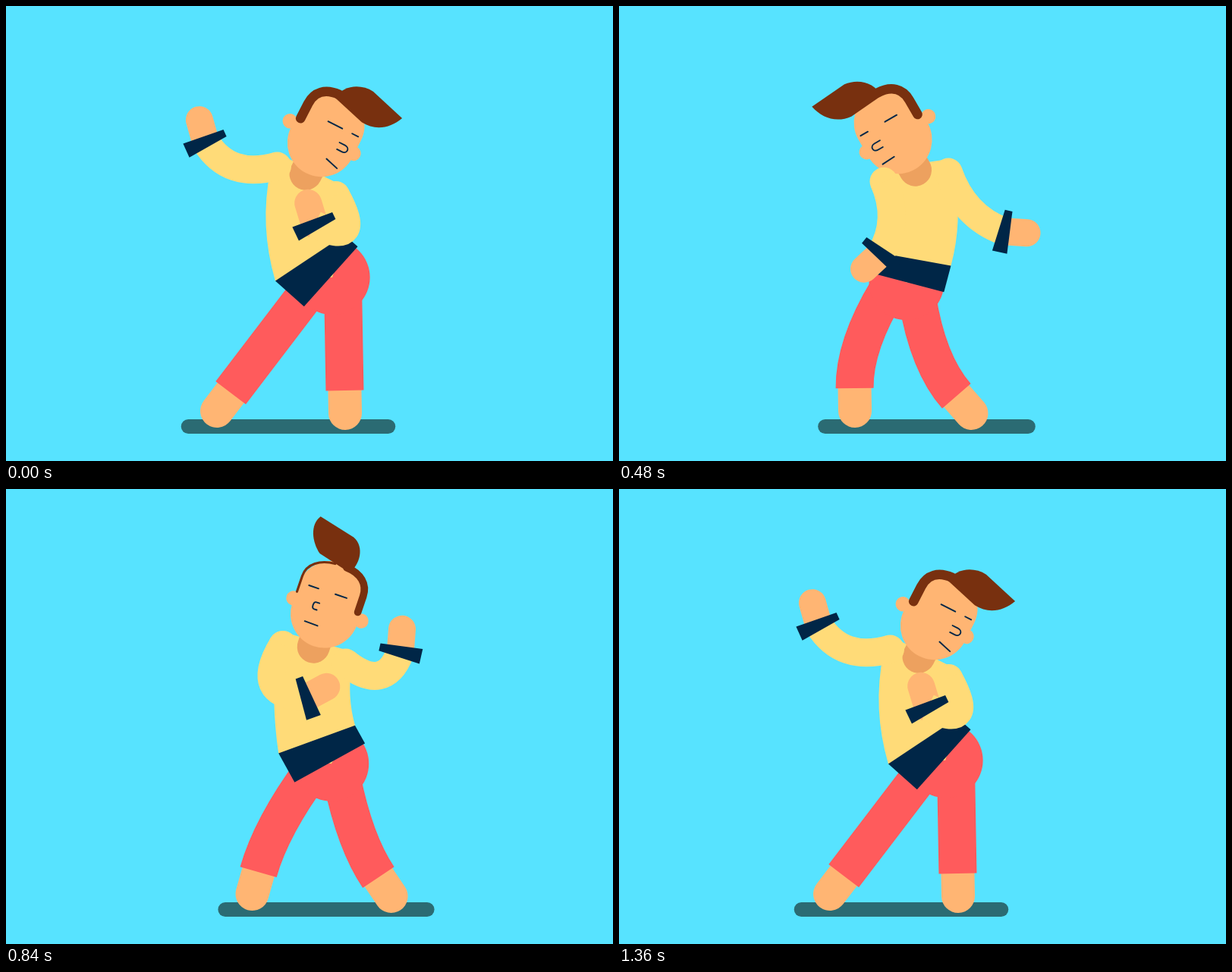
An HTML page with a canvas that plays this animation: 800x600 px, repeating every 1400 ms.

```html
<!DOCTYPE html>
<html lang="en">
<head>
<meta charset="utf-8">
<title>Dancer</title>
<style>
html, body { margin: 0; height: 100%; overflow: hidden; background: #57e3ff; }
canvas { display: block; width: 800px; height: 600px; }
</style>
</head>
<body>
<canvas id="stage" width="800" height="600"></canvas>
<script>
const ctx = document.getElementById('stage').getContext('2d');
const LOOP = 1400, STEP = 40, CYCLE = 1360;
const SKY = '#57e3ff', SHADE = '#2b6b73', SKIN = '#ffb573', NECK = '#eda15f',
      HAIR = '#78300f', SHIRT = '#ffdb78', NAVY = '#002647', RED = '#ff5b5c';

// Quiff outlines, y up: curve p0-p3, line to p4, curve to p7
const QUIFF_SIDE = [[-11, 61], [-9, 80], [10, 93], [30, 91], [80, 77], [72, 58], [56, 46], [35, 48]];
const QUIFF_FRONT = [[-17, 62], [-22, 74], [-42, 100], [-18, 101], [34, 102], [56, 101], [38, 66], [28, 62]];

let time = 0;

const rad = d => d * Math.PI / 180;
const clamp = (v, lo = -1, hi = 1) => Math.max(lo, Math.min(hi, v));
const smooth = u => u * u * (3 - 2 * u);
const ease = (from, to) => smooth(clamp((time - from) / (to - from), 0, 1));
// Harmonic n of the dance cycle, shifted by a phase in degrees
const wave = (n = 1, shift = 0, offset = 0) =>
  Math.cos(rad(n * (time / CYCLE * 360 + offset) + shift));
const polar = (r, deg) => [r * Math.cos(rad(deg)), r * Math.sin(rad(deg))];
const add = (a, b) => [a[0] + b[0], a[1] + b[1]];

function disc([x, y], r, color) {
  ctx.fillStyle = color;
  ctx.beginPath();
  ctx.arc(x, y, r, 0, 7);
  ctx.fill();
}
function stroke(color, width, cap, path) {
  ctx.strokeStyle = color;
  ctx.lineWidth = width;
  ctx.lineCap = cap;
  ctx.beginPath();
  path();
  ctx.stroke();
}
function line(color, width, a, b) {
  stroke(color, width, 'round', () => { ctx.moveTo(...a); ctx.lineTo(...b); });
}
function bend(color, width, a, mid, b) {
  stroke(color, width, 'butt', () => { ctx.moveTo(...a); ctx.quadraticCurveTo(...mid, ...b); });
}
function poly(color, ...points) {
  ctx.fillStyle = color;
  ctx.beginPath();
  points.forEach(p => ctx.lineTo(...p));
  ctx.fill();
}

// The knee bows out to the left as the hips sink.
function leg(hip, joint, foot) {
  const a = add(hip, joint), dx = foot[0] - a[0], dy = foot[1] - a[1];
  const bow = 60 * (1 - Math.exp(Math.min(0, 358 - hip[1]) / 13)) / Math.hypot(dx, dy);
  const knee = [a[0] + dx / 2 - dy * bow, a[1] + dy / 2 + dx * bow];
  const shin = Math.atan2(knee[1] - foot[1], knee[0] - foot[0]) * 180 / Math.PI;
  const hem = add(foot, polar(30, shin));
  line(SKIN, 44, hem, foot);
  bend(RED, 50, a, knee, hem);
}

function torso(hip, sway, left, right) {
  const corner = (x, y) => add(add(hip, [-2, -1]), add(polar(x, sway), polar(y, sway + 90)));
  const bl = corner(-53, 0), br = corner(53, 0);
  const tl = corner(-53, 0.37 * sway - 33), tr = corner(53, -0.2 * sway - 33);
  const a = add(left, [-9, 6]), b = add(right, [8, 6]);
  const side = (p, q) => [(p[0] + q[0] + sway) / 2 + 6, (p[1] + q[1]) / 2];
  ctx.fillStyle = SHIRT;
  ctx.beginPath();
  ctx.moveTo(left[0], left[1] - 17);
  ctx.lineTo(...a);
  ctx.quadraticCurveTo(...side(a, tl), ...tl);
  ctx.lineTo(...hip);
  ctx.lineTo(...tr);
  ctx.quadraticCurveTo(...side(b, tr), ...b);
  ctx.lineTo(right[0], right[1] - 17);
  ctx.fill();
  poly(NAVY, tl, tr, br, bl);
}

// Both arms follow one motion, half a cycle apart and mirrored.
function arm(shoulder, side, { swing, lag, skew, lift, lead }) {
  const half = side < 0 ? 180 : 0;
  const w = (n, shift) => wave(n, shift, half);
  const hand = 485 + swing * w(1, -lag) - 37 * w(2, skew) + 20 * w(3, 0);
  const upper = 114 + lift * w(1, lead) + 27 * w(2, -23);
  const fore = hand - Math.min(16, (hand - 407) * 0.4);
  const tuck = 14 * smooth(clamp((390 - hand) / 60, 0, 1));
  const dip = Math.exp(-(((hand - 450) / 70) ** 2));
  const flare = 2.5 * clamp((hand - 450) / 30);
  const elbow = polar(66 + tuck - 16 * dip, upper);
  const wrist = add(elbow, polar(59 + tuck - 12 * dip, fore));

  ctx.save();
  ctx.translate(...shoulder);
  ctx.scale(side, 1);
  line(SKIN, 36, wrist, add(wrist, polar(30, hand)));
  disc([0, 0], 18.5, SHIRT);
  bend(SHIRT, 37, [0, 0], elbow, wrist);
  ctx.translate(...wrist);
  ctx.rotate(rad(hand + 90 - 3.4 * flare));
  const p = 7.5 - flare, m = 7.5 + flare;
  poly(NAVY, [-28, -m], [28, -p], [28, p], [-28, m]);
  ctx.restore();
}

function quiff(turn, lift) {
  const px = -11, py = 67;
  let side = QUIFF_SIDE.map(([x, y]) =>
    add([px, py], add(polar(x - px, lift), polar(y - py, lift + 90))));
  if (turn < 0) side = side.reverse().map(([x, y]) => [-x, y]);
  const k = Math.abs(turn);
  const p = QUIFF_FRONT.map((f, i) => f.map((v, j) => v + (side[i][j] - v) * k));
  ctx.fillStyle = HAIR;
  ctx.beginPath();
  ctx.moveTo(...p[0]);
  ctx.bezierCurveTo(...p[1], ...p[2], ...p[3]);
  ctx.lineTo(...p[4]);
  ctx.bezierCurveTo(...p[5], ...p[6], ...p[7]);
  ctx.fill();
}

function rim(side, turn) {
  const w = 6.4 - 6.3 * side * turn, x = side * (45.5 - w / 2);
  if (w < 1) return;
  stroke(HAIR, w, 'round', () => {
    ctx.moveTo(x, 16);
    ctx.lineTo(x, 38);
    ctx.bezierCurveTo(x, 55, side * 28, 66, side * 8, 67);
  });
}

function face(t) {
  const eye = (x, half) => line(NAVY, 1.9, [x - half, 29], [x + half, 29]);
  eye(-14.5 + 20 * t, 8 + 2.5 * t);
  eye(20.5 + 14.5 * t, 6.75 - 2.25 * t);
  stroke(NAVY, 1.9, 'round', () => {
    ctx.moveTo(21 * t, 11);
    ctx.lineTo(29 * t, 11);
    ctx.bezierCurveTo(37 * t, 11, 37 * t, 1.5, 29 * t, 1.5);
    ctx.lineTo(22 * t, 1.5);
  });
  line(NAVY, 1.9, [24.5 * t - 9, t - 17], [24.5 * t + 9, -19 - 2 * t]);
}

function head(neck) {
  const tilt = 27 - 57 * ease(0, 360) + 53 * ease(480, 680) - 30 * ease(740, 1160) + 34 * ease(1160, CYCLE);
  const turn = clamp(-1.4 * (wave(1, -150) + 0.07));
  const center = add(neck, polar(46, tilt - 90));
  line(NECK, 43, neck, center);
  ctx.save();
  ctx.translate(...center);
  ctx.rotate(rad(tilt));
  ctx.scale(1, -1);
  for (const side of [-1, 1]) disc([47 * side - 3 * turn, 6.5], 9.7, SKIN);
  line(SKIN, 90, [0, 0], [0, 26]);
  rim(-1, turn);
  rim(1, turn);
  quiff(clamp(-1.7 * (wave(1, -145) + 0.2)), 38 * Math.max(0, wave(1, -200)));
  face(turn);
  ctx.restore();
}

function draw() {
  const hip = [
    420.5 + 37.4 * wave(1, 71) + 5.6 * wave(2, 27) - 7.5 * wave(3),
    361 - 4 * wave(1, 30) + 26 * Math.max(0, wave(1, -305)) ** 8
  ];
  const sway = -19 + 30 * wave(1, -116) - 16 * wave(2);
  const neck = add(hip, polar(148 - 8 * wave(1, -30), 0.3 * sway - 90));
  // Shoulders tilt against the hips.
  const chest = add(neck, [1, 9]);
  const left = add(chest, polar(-43, -0.55 * sway)), right = add(chest, polar(43, -0.55 * sway));

  const back = ease(1160, CYCLE);
  const footL = 278 + 33 * ease(160, 480) + 52 * ease(680, 1160) - 85 * back;
  const footR = 447 + 76 * (ease(200, 1100) - back);
  const shadow = 372 + 50 * (ease(0, 780) - ease(1000, CYCLE));
  const spread = 131.5 + 0.3 * (hip[1] - 357);

  ctx.fillStyle = SKY;
  ctx.fillRect(0, 0, 800, 600);
  line(SHADE, 19, [shadow - spread, 554.5], [shadow + spread, 554.5]);
  leg(hip, [-24, 8], [footL, 534]);
  leg(hip, [14, 20], [footR, 537]);
  disc(hip, 49.5, RED);
  torso(hip, sway, left, right);
  head(neck);
  arm(left, 1, { swing: 147, lag: 22, skew: -43, lift: 32, lead: 38 });
  arm(right, -1, { swing: 163, lag: 0, skew: 66, lift: 20, lead: 0 });
}

function tick() {
  time = Math.floor(performance.now() % LOOP / STEP) * STEP % CYCLE;
  draw();
  requestAnimationFrame(tick);
}
tick();
</script>
</body>
</html>
```
